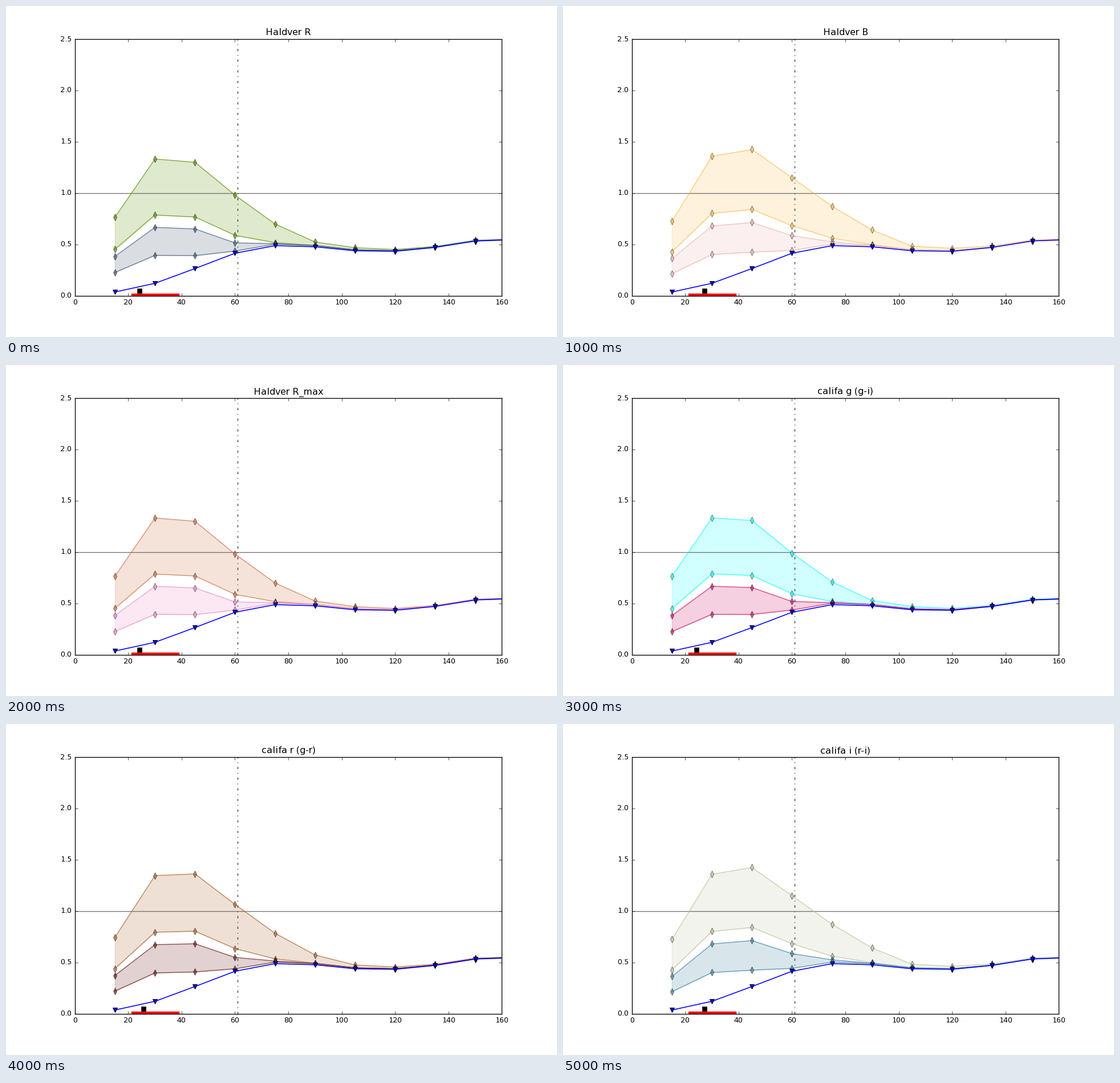
A matplotlib script that plays this animation: 966x580 px, repeating every 6 s.

```python
import numpy as np
import matplotlib.pyplot as plt
from matplotlib.animation import FuncAnimation

plt.style.use("classic")
plt.rcParams.update({
    "font.family": "DejaVu Sans",
    "font.size": 10,
    "text.hinting_factor": 1,
    "figure.facecolor": "white",
    "savefig.dpi": "figure",
})

W, H, DPI = 966, 580, 96
X = np.arange(15, 166, 15)

BASE = np.array([.035, .12, .264, .413, .487, .476, .437, .432, .47, .533, .548])
FLOOR = BASE + (150 - X) / 5000

# Disc curve for a compact and for a wide disc
COMPACT = np.array([.765, 1.332, 1.3, .979, .688, .456, .39, .35, .345, .38, .38])
WIDE = np.array([.724, 1.359, 1.424, 1.149, .869, .625, .425, .39, .37, .4, .4])

# title, disc width from 0 to 1, outer colour, inner colour
SCENES = [
    ("Haldver R", 0, (95, 145, 8), (70, 90, 118)),
    ("Haldver B", 1, (252, 190, 85), (235, 180, 175)),
    ("Haldver R_max", 0, (205, 115, 70), (235, 140, 195)),
    ("califa g (g-i)", .06, (25, 254, 250), (205, 20, 100)),
    ("califa r (g-r)", .5, (170, 100, 45), (105, 30, 25)),
    ("califa i (r-i)", 1, (190, 195, 160), (62, 130, 160)),
]

fig = plt.figure(figsize=(W / DPI, H / DPI), dpi=DPI)
ax = fig.add_axes([.125, .125, .775, .775])


def soft_max(a, b, p=7):
    return (a**p + b**p) ** (1 / p)


def band(disc, rgb):
    color = np.array(rgb) / 255
    top, bottom = soft_max(disc, FLOOR), soft_max(.59 * disc, FLOOR)
    ax.fill_between(X, bottom, top, color=color, alpha=.2, linewidth=1)
    for y in (top, bottom):
        ax.plot(X, y, "-d", color=color, alpha=.7, lw=1, ms=6,
                mec="black", mew=.5)


def draw(i):
    title, width, outer, inner = SCENES[i % len(SCENES)]
    disc = COMPACT + width * (WIDE - COMPACT)
    ax.clear()
    ax.axhline(1, color="0.45", lw=1)
    ax.axvline(61, color="0.2", lw=1, ls="-.")
    band(disc, outer)
    band(disc / 2, inner)
    ax.plot(X, BASE, "-v", color="blue", lw=1.2, ms=6, mec="black", mew=.7)
    ax.plot([22, 38], [0, 0], color="red", lw=7, solid_capstyle="projecting")
    ax.plot(24.1 + 3.2 * width, .05, "s", color="black", ms=6, mew=.5)
    ax.set_xlim(0, 160)
    ax.set_ylim(0, 2.5)
    ax.set_title(title)
    return []


anim = FuncAnimation(fig, draw, frames=len(SCENES), init_func=lambda: draw(0),
                     interval=1000, repeat=True, repeat_delay=0)
plt.show()
```
